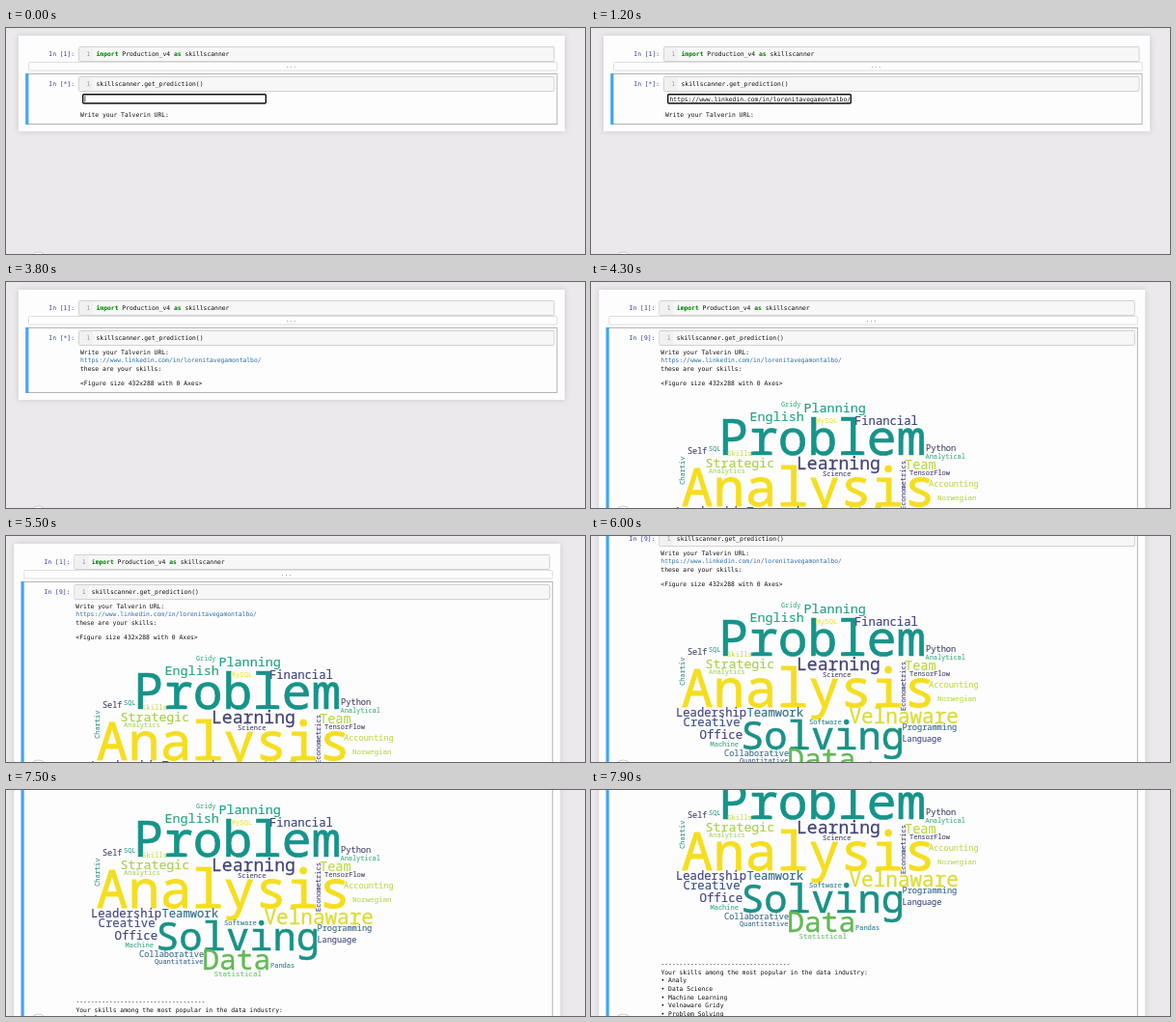
These frames come from a looping animation (600x234 px, 8000 ms). An HTML page:

```html
<!DOCTYPE html>
<html lang="en">
<head>
<meta charset="utf-8">
<title>Notebook</title>
<style>
  html, body { margin: 0; width: 100%; height: 100%; overflow: hidden; background: #ebe9ec; }
  svg { display: block; width: 600px; height: 234px; }
  text { font-family: "DejaVu Sans Mono", monospace; white-space: pre; }
  .word { font-family: "Noto Sans Mono", monospace; }
  .panel { fill: #fefdfe; filter: drop-shadow(0 0 3px rgba(87, 87, 87, .22)); }
</style>
</head>
<body>
<svg id="stage" viewBox="0 0 600 234" xmlns="http://www.w3.org/2000/svg">
  <clipPath id="field"><rect x="80" y="69" width="188.5" height="9"/></clipPath>
</svg>
<script>
const LOOP = 8000;
const PASTE = 100, SUBMIT = 1400, RESULT = 3400, CLOUD = 3950;
const CODE = 6.36, LINE = 8.6, PAPER = "#fefdfe";
const URL_TEXT = "https://www.linkedin.com/in/lorenitavegamontalbo/";

// word, x, baseline, size, colour, vertical
const WORDS = [
  ["Problem", 132.3, 179, 51.2, "#16948a"],
  ["Analysis", 93.6, 232, 54.9, "#f5de20"],
  ["Solving", 155, 276, 40.5, "#1a9287"],
  ["Data", 203.3, 296, 29.5, "#63b957"],
  ["Velnaware", 267.5, 248.5, 21, "#dcdc36"],
  ["Learning", 213, 194, 18.1, "#424377"],
  ["Planning", 220.5, 134.5, 13.4, "#1fa187"],
  ["English", 164.5, 144, 13.4, "#28a880"],
  ["Financial", 273, 148, 12.2, "#3f4580"],
  ["Gridy", 197, 128.5, 6.8, "#3fb080"],
  ["MySQL", 233, 146, 7.5, "#ece53b"],
  ["Python", 347, 175, 8.7, "#434670"],
  ["Analytical", 346.5, 183, 6.9, "#3fb080"],
  ["TensorFlow", 330, 200, 7, "#454470"],
  ["Team", 325, 194, 13.6, "#bcd94a"],
  ["Strategic", 118.5, 192, 13.3, "#a9cf50"],
  ["Skills", 141, 179.5, 7.2, "#c8dc50"],
  ["SQL", 122, 175, 6.9, "#2f9e8d"],
  ["Self", 100, 177.5, 8.5, "#45446c"],
  ["Analytics", 122, 197.5, 7, "#a9d460"],
  ["Science", 240, 200.5, 7, "#454470"],
  ["Chartiv", 97, 210, 7, "#2f938c", true],
  ["Econometrics", 326, 236, 7.1, "#46447a", true],
  ["Accounting", 350, 212, 8.6, "#c2d84a"],
  ["Norwegian", 359, 225.5, 7.5, "#b4d850"],
  ["Leadership", 88, 241.5, 12.2, "#454580"],
  ["Teamwork", 161.5, 242, 12.2, "#2f6f8a"],
  ["Creative", 95.5, 252, 12.3, "#3f5488"],
  ["Office", 112.5, 265, 12.4, "#434880"],
  ["Machine", 123.5, 272.5, 7, "#35ae84"],
  ["Collaborative", 138, 283, 8.6, "#3a6f8c"],
  ["Quantitative", 154, 289.5, 7, "#3a6a8c"],
  ["Statistical", 215.5, 303, 7.5, "#68c46c"],
  ["Pandas", 274, 293.5, 7, "#2f838c"],
  ["Software", 226, 250, 7, "#2f838c"],
  ["Programming", 322.5, 255.5, 8.6, "#3a6a8c"],
  ["Language", 322.5, 267.5, 8.5, "#434c84"]
];

const REPORT = [
  "-".repeat(35),
  "Your skills among the most popular in the data industry:",
  "• Analy",
  "• Data Science",
  "• Machine Learning",
  "• Velnaware Gridy",
  "• Problem Solving"
];

const stage = document.getElementById("stage");

function make(tag, attrs, parent) {
  const el = document.createElementNS(stage.namespaceURI, tag);
  for (const key in attrs) el.setAttribute(key, attrs[key]);
  return parent.appendChild(el);
}

function box(parent, x, y, w, h, fill, stroke, extra) {
  return make("rect", { x, y, width: w, height: h, fill, stroke: stroke || "none", ...extra }, parent);
}

function label(parent, str, x, y, fill = "#111", size = CODE, extra) {
  const el = make("text", { x, y, fill, "font-size": size, ...extra }, parent);
  el.textContent = str;
  return el;
}

function codeBox(parent, y) {
  box(parent, 75.5, y, 492.5, 15, "#f7f7f7", "#d2d2d2", { rx: 1 });
  box(parent, 76, y + .5, 14, 14, "#f1f1f1");
  label(parent, "1", 83.5, y + 9.8, "#999");
}

const page = make("g", {}, stage);
const notebook = make("g", {}, page);
const panel = make("rect", { class: "panel", x: 13, y: 8, width: 566, height: 99 }, notebook);

// first cell
label(notebook, "In [1]:", 44.3, 28.5, "#303f9f");
codeBox(notebook, 19.5);
const code = label(notebook, "", 93.5, 28.8);
[["import", 1], [" Production_v4 ", 0], ["as", 1], [" skillscanner", 0]].forEach(([str, key]) => {
  make("tspan", key ? { fill: "#008000", "font-weight": 700 } : {}, code).textContent = str;
});
box(notebook, 23.5, 35.5, 547.5, 8.5, PAPER, "#dedede", { rx: 1 });
label(notebook, "...", 289.5, 41, "#888");

// second cell
const cell = box(notebook, 21.5, 47.5, 549.5, 51, PAPER, "#b4b4b4");
const bar = box(notebook, 20.2, 47, 3.2, 52, "#42a5f5");
const prompt = label(notebook, "", 44.3, 60.3, "#303f9f");
codeBox(notebook, 50.5);
label(notebook, "skillscanner.get_prediction()", 93.5, 60);

const entry = make("g", {}, notebook);
box(entry, 79.7, 68.7, 189.6, 9.3, "#fff", "#111", { rx: 1, "stroke-width": 1.4 });
const caret = box(entry, 81.5, 70.3, .8, 6.2, "#222");
const pasted = label(make("g", { "clip-path": "url(#field)" }, entry), URL_TEXT, 81.5, 75.6);

const ask = label(notebook, "Write your Talverin URL:", 77, 92);
const link = label(notebook, URL_TEXT, 77, 83.3, "#296eaa");
const result = make("g", {}, notebook);
label(result, "these are your skills:", 77, 92);
label(result, "<Figure size 432x288 with 0 Axes>", 77, 106.7);

// word cloud and report
const cloud = make("g", {}, page);
for (const [word, x, y, size, fill, up] of WORDS) {
  const look = { class: "word", stroke: fill, "stroke-width": size * .014 };
  if (up) look.transform = `rotate(-90 ${x} ${y})`;
  label(cloud, word, x, y, fill, size, look);
}
REPORT.forEach((str, i) => label(cloud, str, 72.4, 331.2 + i * LINE));

make("circle", { cx: 33.5, cy: 241, r: 9, fill: "#fff", stroke: "#c6c6c6", "stroke-width": .9 }, stage);

function show(el, on) {
  el.setAttribute("visibility", on ? "visible" : "hidden");
}

function ease(t, from, to) {
  const p = Math.min(1, Math.max(0, (t - from) / (to - from)));
  return p * p * (3 - 2 * p);
}

function draw(t) {
  const sent = t >= SUBMIT, done = t >= RESULT, full = t >= CLOUD;
  const bottom = full ? 600 : done ? 122 : sent ? 98.5 : 107;
  panel.setAttribute("height", bottom - 8);
  cell.setAttribute("height", bottom - 55);
  bar.setAttribute("height", bottom - 54);
  prompt.textContent = full ? "In [9]:" : "In [*]:";

  show(entry, !sent);
  show(caret, t < PASTE);
  show(pasted, t >= PASTE && !sent);
  ask.setAttribute("y", sent ? 74.6 : 92);
  show(link, sent);
  show(result, done);
  show(cloud, full);

  const scroll = 55 * ease(t, 5600, 5800) + 55 * ease(t, 6150, 6400) + 39 * ease(t, 7650, 7890);
  page.setAttribute("transform", `translate(0 ${-scroll})`);
  notebook.setAttribute("transform", `translate(${full ? -4.7 : 0} 0)`);
}

let start;
function tick(now) {
  if (start === undefined) start = now;
  draw((now - start) % LOOP);
  requestAnimationFrame(tick);
}
draw(0);
requestAnimationFrame(tick);
</script>
</body>
</html>
```
